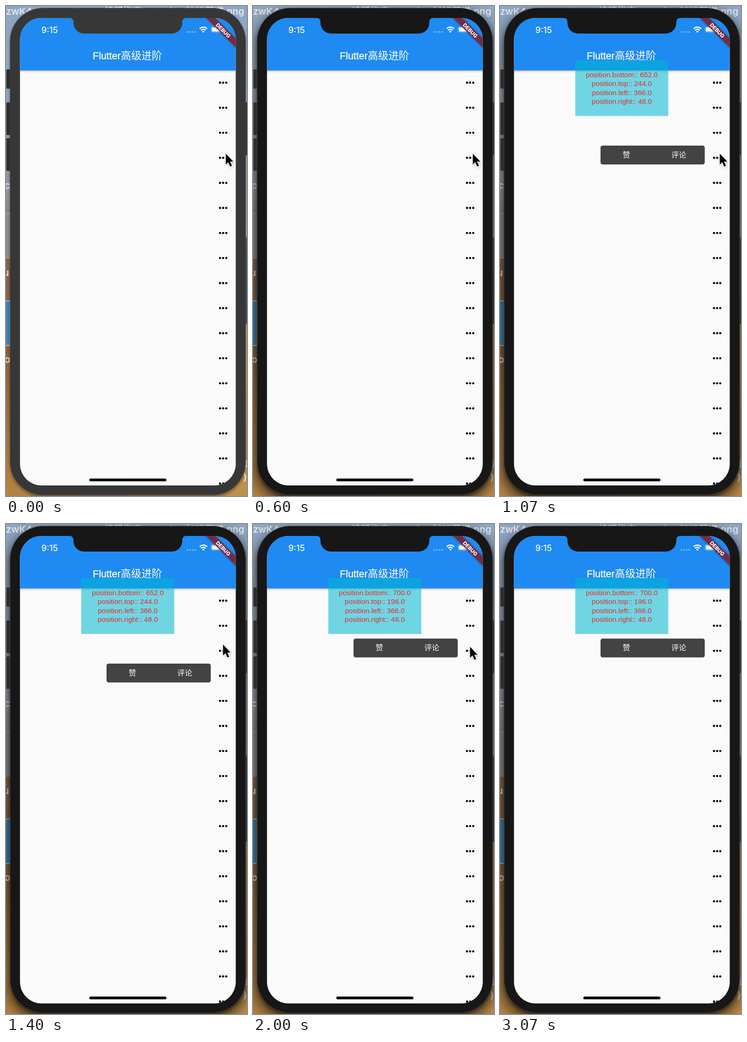
Recreate the animation shown at these times as an HTML page. Size 525x1067 px, loop 3140 ms.

```html
<!DOCTYPE html>
<html lang="zh">
<head>
<meta charset="utf-8">
<title>Popup menu demo</title>
<style>
html, body { margin: 0; height: 100%; overflow: hidden; background: #171717; }
svg { display: block; width: 100vw; height: 100vh; }
text { font-family: "Liberation Sans", "Noto Sans CJK SC", "Noto Sans CJK JP", sans-serif; fill: #fff; }
.ui { font-family: Inter, "Noto Sans CJK SC", "Noto Sans CJK JP", sans-serif; }
.cjk { font-family: "Noto Sans CJK SC", "Noto Sans CJK JP", sans-serif; font-weight: 500; }
.mid { text-anchor: middle; }
.desk { font-size: 20.5px; font-weight: 600; fill: #e4e7ea; }
#info text { font-size: 15.5px; fill: #e02d2c; }
</style>
</head>
<body>
<svg viewBox="0 0 525 1067" preserveAspectRatio="none">
  <defs>
    <linearGradient id="leftSky" x2="0" y2="1">
      <stop offset="0" stop-color="#8da6c5"/>
      <stop offset=".13" stop-color="#93a7bd"/>
      <stop offset=".38" stop-color="#92959e"/>
      <stop offset=".5" stop-color="#85664f"/>
      <stop offset=".7" stop-color="#8a6138"/>
      <stop offset="1" stop-color="#b48344"/>
    </linearGradient>
    <linearGradient id="rightSky" x2="0" y2="1">
      <stop offset="0" stop-color="#8da6c5"/>
      <stop offset=".47" stop-color="#a9afb9"/>
      <stop offset=".475" stop-color="#535b6b"/>
      <stop offset=".648" stop-color="#4a5060"/>
      <stop offset=".65" stop-color="#d8a864"/>
      <stop offset="1" stop-color="#c08f4d"/>
    </linearGradient>
    <linearGradient id="barShade" x2="0" y2="1">
      <stop offset="0" stop-opacity=".32"/>
      <stop offset=".4" stop-opacity=".1"/>
      <stop offset="1" stop-opacity="0"/>
    </linearGradient>
    <filter id="soft" x="-20%" y="-20%" width="140%" height="140%"><feGaussianBlur stdDeviation="3"/></filter>
    <filter id="wide" x="-20%" y="-20%" width="140%" height="140%"><feGaussianBlur stdDeviation="14"/></filter>
    <clipPath id="screen"><rect x="30.5" y="26" width="470" height="1018" rx="47"/></clipPath>
  </defs>

  <!-- desktop -->
  <rect width="263" height="1067" fill="url(#leftSky)"/>
  <rect x="262" width="263" height="1067" fill="url(#rightSky)"/>
  <rect x="-90" y="452" width="99" height="97" fill="#8f8d8b" stroke="#bbb"/>
  <rect x="-90" y="642" width="99" height="97" fill="#3d85b4" stroke="#bbb" stroke-width="2"/>
  <rect x="167" y="1060" width="100" height="7" fill="#a07a8c"/>
  <g class="ui desk">
    <text class="ui desk" x="0" y="19">zwK4</text>
    <text class="ui desk" x="519" y="19" text-anchor="end">Flutter 编程指南 - Outline 知识图谱.png</text>
    <text class="ui desk" x="-3" y="398">c</text>
    <text class="ui desk" x="-6" y="588">u</text>
    <text class="ui desk" x="-3" y="777">o</text>
    <text class="ui desk" x="510" y="1005">集</text>
    <text class="ui desk" x="517" y="1033">)</text>
  </g>

  <!-- phone -->
  <rect x="9" y="8" width="513" height="1061" rx="72" filter="url(#soft)" opacity=".4"/>
  <rect id="focusShade" x="5" y="14" width="521" height="1065" rx="72" filter="url(#wide)" opacity=".6"/>
  <g fill="#2d2d2d" stroke="#555" stroke-width=".6">
    <rect x="1" y="138" width="10" height="42" rx="2"/>
    <rect x="1" y="210" width="10" height="71" rx="2"/>
    <rect x="1" y="288" width="10" height="71" rx="2"/>
    <rect x="520" y="210" width="10" height="115" rx="2"/>
  </g>
  <g id="bezel">
    <rect x="9" y="4.5" width="513" height="1060" rx="72" stroke="#4a4a4a" stroke-width=".8"/>
    <g clip-path="url(#screen)">
      <rect x="30" y="26" width="471" height="1018" fill="#fafafa"/>
      <circle id="ripple" cx="473" cy="330" r="36" fill="#000"/>
      <g id="rows" fill="#000"></g>
      <rect x="30" y="140" width="471" height="6" fill="url(#barShade)"/>
      <rect x="30" y="26" width="471" height="114" fill="#1e8af2"/>
      <text class="ui" x="77" y="58.5" font-size="18.5" font-weight="500">9:15</text>
      <text x="189" y="116" font-size="21.5" stroke="#fff" stroke-width=".35">Flutter</text>
      <text class="cjk" x="250" y="116" font-size="22.5">高级进阶</text>

      <g id="signal" fill="#fff" opacity=".35"></g>
      <g fill="none" stroke="#fff" stroke-width="2.5">
        <path d="M421.9 49.3A11.5 11.5 0 0 1 438.1 49.3M425 52.8A7 7 0 0 1 435 52.8"/>
        <path d="M427.3 55.4A3.7 3.7 0 0 1 432.7 55.4L430 58.3Z" fill="#fff" stroke="none"/>
        <rect x="446.5" y="44.7" width="25" height="13" rx="4" stroke-width="1" opacity=".45"/>
      </g>
      <rect x="448.4" y="46.6" width="20" height="9.2" rx="2" fill="#fff"/>

      <g id="popup">
        <g id="info">
          <rect x="164" y="117.5" width="202.5" height="122" fill="#00b8d2" opacity=".55"/>
        </g>
        <g id="menu">
          <rect x="219" y="304" width="227" height="41" rx="4.5" fill="#434343"/>
          <text class="cjk mid" x="275.5" y="330" font-size="16.3">赞</text>
          <text class="cjk mid" x="389.5" y="330" font-size="16.3">评论</text>
        </g>
      </g>

      <g transform="translate(500.5 26) rotate(45)">
        <rect x="-60" y="31.8" width="120" height="13.6" filter="url(#soft)" opacity=".5"/>
        <rect x="-60" y="31.8" width="120" height="13.6" fill="#742c42"/>
        <text class="ui mid" y="42.8" font-size="11.4" font-weight="800">DEBUG</text>
      </g>
      <rect x="181.5" y="1029" width="168" height="6" rx="3" fill="#000"/>
    </g>
    <path d="M138 25H393V26Q384 26 384 35V37A23 23 0 0 1 361 60H170A23 23 0 0 1 147 37V35Q147 26 138 26Z"/>
  </g>

  <g id="cursor">
    <path d="M1 4V27L7 23 11 32 16 30 12 21H20Z" filter="url(#soft)" opacity=".3"/>
    <path d="M.8 1.5V25.3L6.2 20.3 10.2 29.6 14.2 27.9 10.2 18.7H17.3Z" stroke="#fff" stroke-width="2.6" stroke-linejoin="round" paint-order="stroke"/>
  </g>
</svg>
<script>
const LOOP = 3140, FOCUS = 70, FIRST_TAP = 670, FIRST_MENU = 730, SECOND_MENU = 1870;
const ROW_TOP = 167, ROW_STEP = 54.55;
const byId = id => document.getElementById(id);

function add(parent, tag, attrs) {
  const node = document.createElementNS('http://www.w3.org/2000/svg', tag);
  for (const name in attrs) node.setAttribute(name, attrs[name]);
  return byId(parent).appendChild(node);
}

for (let row = 0; row < 17; row++)
  for (let dot = -1; dot <= 1; dot++)
    add('rows', 'circle', { cx: 473 + dot * 6.8, cy: ROW_TOP + row * ROW_STEP, r: 2.4 });

for (let i = 0; i < 4; i++) add('signal', 'circle', { cx: 395 + i * 5.6, cy: 56.5, r: 2 });

const lines = [0, 1, 2, 3].map(i => add('info', 'text', { class: 'mid', x: 265.3, y: 154.8 + i * 19.4 }));

const clamp = v => Math.min(1, Math.max(0, v));
const progress = (t, from, to) => clamp((t - from) / (to - from));
const mix = (a, b, k) => a + (b - a) * k;
const smooth = k => k * k * (3 - 2 * k);

function cursorAt(t) {
  const toThird = smooth(progress(t, 1100, 1400));
  const nudge = progress(t, 1770, 1830);
  const leave = progress(t, 2290, 2590) ** 1.6;
  return [mix(478, 472, toThird) - 50 * leave, mix(320, 261, toThird) + 5 * nudge - 310 * leave];
}

function draw(t) {
  const focused = t >= FOCUS;
  byId('bezel').setAttribute('fill', focused ? '#171717' : '#373737');
  byId('focusShade').style.display = focused ? '' : 'none';

  const ripple = progress(t, FIRST_TAP, FIRST_MENU) * (1 - progress(t, 850, 1070));
  byId('ripple').setAttribute('opacity', 0.025 * ripple);

  const moved = t >= SECOND_MENU;
  byId('popup').style.display = t >= FIRST_MENU ? '' : 'none';
  byId('menu').setAttribute('transform', `translate(0 ${moved ? -ROW_STEP : 0})`);
  const position = { bottom: moved ? 700 : 652, top: moved ? 196 : 244, left: 366, right: 48 };
  Object.entries(position).forEach(([side, value], i) => {
    lines[i].textContent = `position.${side}:: ${value}.0`;
  });

  byId('cursor').setAttribute('transform', `translate(${cursorAt(t)})`);
}

const start = performance.now();
function tick() {
  draw((performance.now() - start) % LOOP);
  requestAnimationFrame(tick);
}
tick();
</script>
</body>
</html>
```
